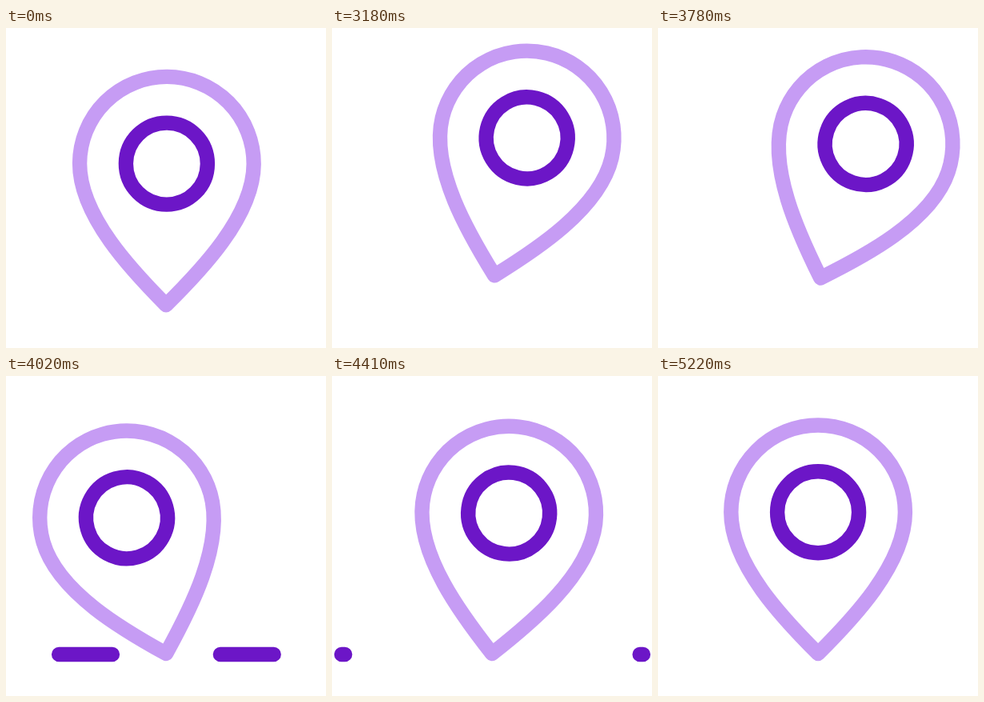
These frames come from a looping animation (400 by 400 pixels, 5250 ms). An HTML page:

```html
<!DOCTYPE html>
<html lang="en">
<head>
<meta charset="utf-8">
<title>Map pin</title>
<style>
  html, body { margin: 0; height: 100%; overflow: hidden; background: #fff; }
  svg { display: block; width: 100vw; height: 100vh; fill: none; stroke-width: 18.4; stroke-linecap: round; stroke-linejoin: round; }
  .light { stroke: #c69cf4; }
  .dark { stroke: #6c16c7; }
</style>
</head>
<body>
<svg viewBox="0 0 400 400">
  <path id="dashes" class="dark"/>
  <!-- The pin's tip is its local origin -->
  <g id="pin">
    <path class="light" d="M0 0C-42 -42 -108.8 -111 -108.8 -176.7A108.8 108.8 0 0 1 108.8 -176.7C108.8 -111 42 -42 0 0Z"/>
    <circle class="dark" cy="-176.7" r="51"/>
  </g>
</svg>
<script>
  const LOOP = 5250, START = 3000, STEP = 30;
  const pin = document.getElementById('pin');
  const dashes = document.getElementById('dashes');

  const bezier = (x1, y1, x2, y2) => x => {
    const at = (a, b, u) => 3 * (1 - u) * (1 - u) * u * a + 3 * (1 - u) * u * u * b + u * u * u;
    let lo = 0, hi = 1;
    for (let i = 0; i < 24; i++) {
      const mid = (lo + hi) / 2;
      if (at(x1, x2, mid) < x) lo = mid; else hi = mid;
    }
    return at(y1, y2, lo);
  };

  const rise = bezier(.2, .28, .45, 1);
  const lean = bezier(.2, .28, .5, 1);
  const swing = bezier(.85, 0, .7, 1);
  const fall = x => x * x;
  const outQuad = x => x * (2 - x);
  const smooth = x => x * x * (3 - 2 * x);

  // Each key: [step, value, easing towards it]
  const lift = [[-.13, 0], [18, 67, rise], [29.5, 0, fall]];
  const drift = [[0, 0], [14, 7.7, smooth], [29.5, 0, fall]];
  const tilt = [[-.13, 0], [18, 24.7, lean], [35.5, -17.6, swing], [50, 9.9, smooth], [63, -4, smooth], [74, 0, smooth]];
  const outer = [[30, 47], [40.5, 188.5, outQuad]];
  const inner = [[32.7, 47], [50, 188.5, outQuad]];

  function track(keys, n) {
    if (n <= keys[0][0]) return keys[0][1];
    for (let i = 1; i < keys.length; i++) {
      const [from, a] = keys[i - 1], [to, b, ease] = keys[i];
      if (n < to) return a + (b - a) * ease((n - from) / (to - from));
    }
    return keys[keys.length - 1][1];
  }

  function draw(time) {
    const n = Math.max(0, Math.floor((time % LOOP - START) / STEP));
    pin.setAttribute('transform',
      `translate(${200.1 + track(drift, n)} ${347 - track(lift, n)}) rotate(${track(tilt, n)})`);

    const a = track(inner, n), b = track(outer, n), mid = 200.4;
    dashes.setAttribute('d', n > 30 && n < 50
      ? `M${mid - a} 348H${mid - b}M${mid + a} 348H${mid + b}` : '');
  }

  const begin = performance.now();
  function tick() {
    draw(performance.now() - begin);
    requestAnimationFrame(tick);
  }
  tick();
</script>
</body>
</html>
```
